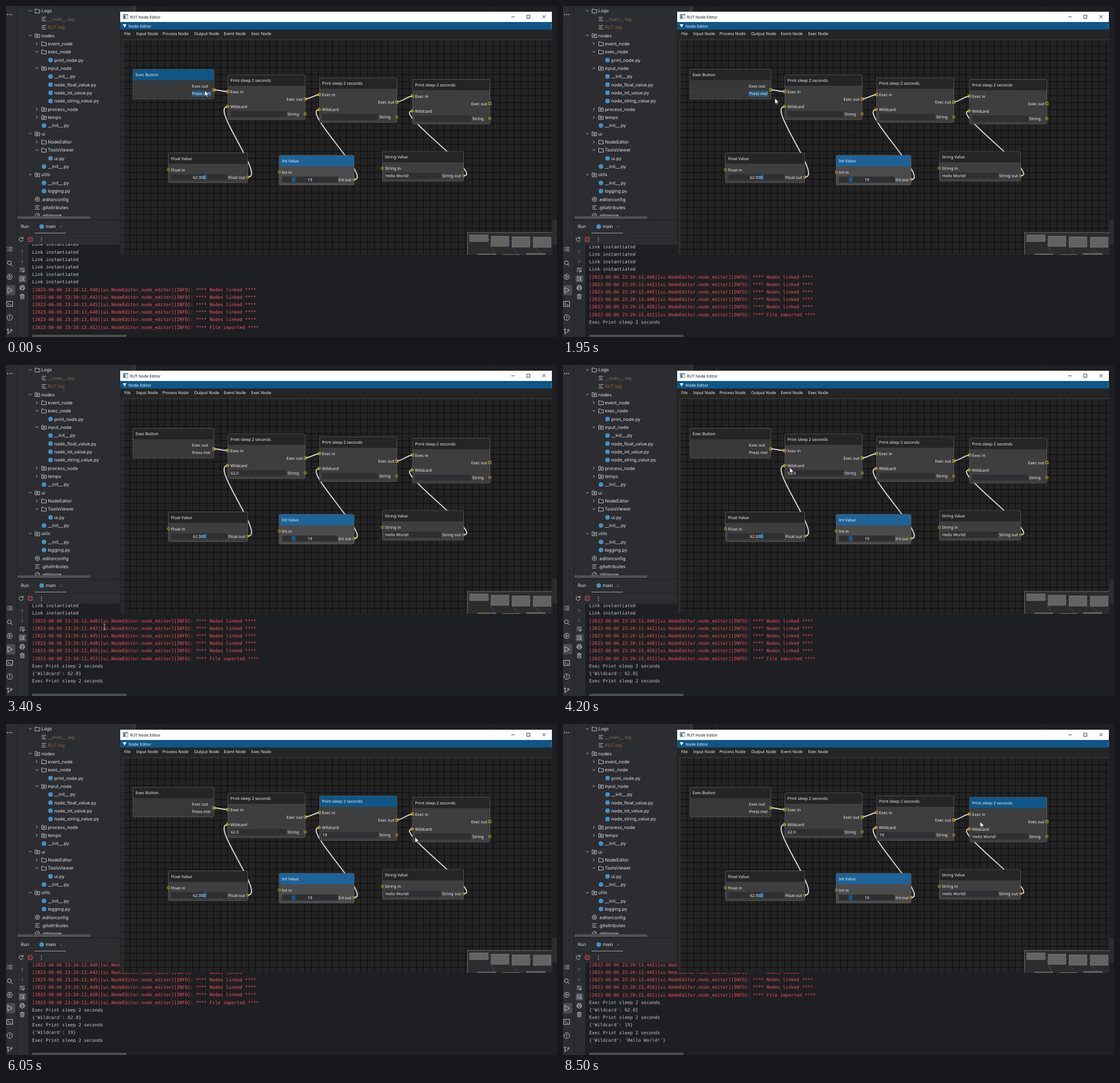
An HTML page for the animation above (8.55 s loop, 965 by 580 pixels).

```html
<!DOCTYPE html>
<html lang="en">
<head>
<meta charset="utf-8">
<title>Node editor</title>
<style>
  html, body { margin: 0; width: 100%; height: 100%; overflow: hidden; background: #1e1f22; }
  svg { display: block; }
  text { white-space: pre; text-rendering: geometricPrecision; }
  .ide { font: 7.95px Inter, sans-serif; fill: #dfe1e5; }
  .log { font: 7.95px "DejaVu Sans Mono", monospace; fill: #c6c8ce; }
  .ui { font: 7.13px "Noto Sans", sans-serif; fill: #f2f2f2; }
  .cap { font: 6.95px "Open Sans", sans-serif; fill: #000; }
  .ico { fill: none; stroke: #ced0d6; stroke-width: .9; stroke-linecap: round; stroke-linejoin: round; }
  .dim { stroke: #5f6268; }
  .link { fill: none; stroke: #d7d7d7; stroke-width: 1.9; }
  .map .link { stroke: #2f5f96; stroke-width: 3.5; }
  .pin { fill: none; stroke: #cdb414; stroke-width: 1; }
</style>
</head>
<body>
<script>
const LOOP = 8550;
const css = [];
let ids = 0;

// Timed keyframes: steps is a list of [ms, declarations]
function anim(steps, timing = 'step-end') {
  const name = 'k' + ids++;
  const frames = steps.map(([ms, d]) => `${(ms / LOOP * 100).toFixed(3)}%{${d}}`).join('');
  css.push(`@keyframes ${name}{${frames}}.${name}{animation:${name} ${LOOP}ms ${timing} infinite}`);
  return name;
}
function during(from, to, body) {
  const steps = [[0, `opacity:${from ? 0 : 1}`]];
  if (from) steps.push([from, 'opacity:1']);
  if (to < LOOP) steps.push([to, 'opacity:0']);
  steps.push([LOOP, `opacity:${to < LOOP ? 0 : 1}`]);
  return `<g class="${anim(steps)}">${body}</g>`;
}

const rect = (x, y, w, h, fill, extra = '') =>
  `<rect x="${x}" y="${y}" width="${w}" height="${h}" fill="${fill}" ${extra}/>`;
const text = (cls, x, y, s, extra = '') =>
  `<text class="${cls}" x="${x}" y="${y + (cls === 'ide' ? 2.85 : 2.6)}" ${extra}>${s}</text>`;
const icon = (d, x, y, cls = '') =>
  `<path class="ico ${cls}" transform="translate(${x} ${y})" d="${d}"/>`;
const dot = (x, y, r, fill) => `<circle cx="${x}" cy="${y}" r="${r}" fill="${fill}"/>`;
const END = 'text-anchor="end"', MID = 'text-anchor="middle"';

// UI refreshes and console prints, in ms
const CLICK = 1150, UI = [3150, 5100, 6900], PRINT = [1450, 3400, 5350, 7300];

/* ---------- IDE behind ---------- */
function tree() {
  // depth, kind (o open, c closed, p python, l log, s settings, t text, i ignore), name
  const rows = `0o Logs|1l __main__.log|1l RUT.log|0O nodes|1c event_node|1o exec_node|2p print_node.py|1O input_node
|2p __init__.py|2p node_float_value.py|2p node_int_value.py|2p node_string_value.py|1C process_node|1C temps|1p __init__.py
|0O ui|1c NodeEditor|1o ToolsViewer|2p ui.py|1p __init__.py|0O utils|1p __init__.py|1p logging.py
|0s .editorconfig|0t .gitattributes|0i .gitignore`.replace(/\n/g, '').split('|');
  const lines = 'M-3.5 -3H3.5M-3.5 0H1.5M-3.5 3H3.5';
  const ring = 'M-3.8 0a3.8 3.8 0 1 0 7.6 0a3.8 3.8 0 1 0 -7.6 0';
  return rows.map((row, i) => {
    const depth = +row[0], kind = row[1], name = row.slice(3);
    const y = 8.6 + 14.35 * i, x = 55 + 11.5 * depth;
    let s = '';
    if (/[oc]/i.test(kind)) {
      s += icon(/o/i.test(kind) ? 'M-2 -1L0 1L2 -1' : 'M-1 -2L1 0L-1 2', x - 12.5, y);
      s += icon('M-4 3.2V-3.2H-1L0.2 -2H4V3.2Z', x, y);
      if (/[OC]/.test(kind)) s += icon('M-1 -.6H1V1.4H-1Z', x, y);
    } else if (kind === 'p') s += dot(x, y, 4, '#4790c2');
    else if (kind === 's') s += icon(ring + 'M-1.4 0a1.4 1.4 0 1 0 2.8 0a1.4 1.4 0 1 0 -2.8 0', x, y);
    else if (kind === 'i') s += icon(ring + 'M-2.6 2.6L2.6 -2.6', x, y);
    else s += icon(lines, x, y);
    const tint = i === 1 ? 'style="fill:#7d6b5b"' : i === 2 ? 'style="fill:#94602f"' : '';
    return s + text('ide', 62 + 11.2 * depth, y, name, tint);
  }).join('');
}

function sidebar() {
  let s = rect(0, 0, 19, 580, '#2b2d30') + rect(0, 489, 16, 18, '#4b4d52', 'rx="3"');
  s += [2.8, 6.6, 10.4].map(x => dot(x, 15, .9, '#ced0d6')).join('');
  const hex = 'M-4.8 0L-2.4 -4.2H2.4L4.8 0L2.4 4.2H-2.4Z';
  s += icon('M-4.5 -3H-4M-2 -3H4.5M-4.5 0H-4M-2 0H4.5M-4.5 3H-4M-2 3H4.5', 6.5, 426);
  s += icon('M-4 -1a3.4 3.4 0 1 0 6.8 0a3.4 3.4 0 1 0 -6.8 0M2 1.6L5 4.6', 6.5, 451);
  s += icon(hex + 'M-1 -2L2 0L-1 2Z', 6.5, 474.5);
  s += icon('M-3 -4.6L4.6 0L-3 4.6Z', 6.5, 498);
  s += icon('M-5 -4.4H5V4.4H-5ZM-3 -2L-1 0L-3 2M0 2H3', 6.5, 522);
  s += icon('M-4.8 0a4.8 4.8 0 1 0 9.6 0a4.8 4.8 0 1 0 -9.6 0M0 -2.6V.6M0 2.4V2.5', 6.5, 546);
  s += icon('M-3 -1.6V5M-4.4 -3a1.4 1.4 0 1 0 2.8 0a1.4 1.4 0 1 0 -2.8 0M1.6 -2a1.4 1.4 0 1 0 2.8 0a1.4 1.4 0 1 0 -2.8 0M3 -.6Q3 2 -3 2.4', 6.5, 570);
  return s;
}

function runPanel() {
  let s = rect(19, 374, 946, 206, '#2b2d30') + rect(19, 374, 946, 1, '#1e1f22');
  s += text('ide', 26, 386.5, 'Run', 'font-weight="600"') + dot(62.5, 386.5, 4, '#4790c2');
  s += text('ide', 69.5, 386.5, 'main') + icon('M-1.8 -1.8L1.8 1.8M1.8 -1.8L-1.8 1.8', 96.5, 387, 'dim');
  s += rect(50, 397, 55, 1.8, '#6f737a') + rect(19, 399, 946, .7, '#1e1f22');
  s += icon('M3 -2A3.5 3.5 0 1 0 3.5 1M3.5 -4V-1.5H1', 26.5, 409);
  s += rect(39, 405.5, 7, 7, '#5a2c30', 'rx="1" stroke="#db5c5c" stroke-width=".9"');
  s += [405.8, 409, 412.2].map(y => dot(62, y, .8, '#ced0d6')).join('');
  s += rect(39, 418, 926, 162, '#1e1f22');
  s += rect(22, 471.5, 13.5, 13, '#4b4d52', 'rx="2.5"');
  s += icon('M0 3V-3M-2.5 -.6L0 -3L2.5 -.6', 28.5, 431, 'dim') + icon('M0 -3V3M-2.5 .6L0 3L2.5 .6', 28.5, 447, 'dim');
  s += icon('M-4 -3H4M-4 0H2.5Q4 0 4 1.5T2.5 3H0M1.4 1.6L0 3L1.4 4.4M-4 3H-2.5', 28.5, 462.5);
  s += icon('M-4 -3H4M-4 0H-1M-4 3H4M2 -1.5V1.5M.6 .4L2 1.6L3.4 .4', 28.5, 478);
  s += icon('M-2.4 -1.5V-4H2.4V-1.5M-2.4 2H-4V-1.5H4V2H2.4M-2.4 .6H2.4V4H-2.4Z', 28.5, 493.5);
  s += icon('M-3.6 -2.6H3.6M-1.2 -2.6V-4H1.2V-2.6M-2.8 -2.6V4H2.8V-2.6M-.9 -.6V2M.9 -.6V2', 28.5, 509);
  return s;
}

function consoleLog() {
  const pitch = 13.2, first = 417.7;
  const stamp = '[2023-06-06 23:20:13,';
  const red = [440, 442, 445, 448, 450, 452].map((ms, i) =>
    `${stamp}${ms}][ui.NodeEditor.node_editor][INFO]: **** ${i < 5 ? 'Nodes linked' : 'File imported'} ****`);
  const exec = 'Exec Print sleep 2 seconds';
  const printed = [[exec], ["{'Wildcard': 62.0}", exec], ["{'Wildcard': 19}", exec], ["{'Wildcard': 'Hello World!'}"]];
  let n = 0, s = '';
  const line = (t, tint = '') => text('log', 45.8, first + pitch * n++, t, tint);
  for (let i = 0; i < 6; i++) s += line('Link instantiated');
  red.forEach(t => { s += line(t, 'style="fill:#f9525f"'); });
  const steps = [[0, 'transform:translateY(0)']];
  printed.forEach((group, i) => {
    s += during(PRINT[i], LOOP, group.map(t => line(t)).join(''));
    steps.push([PRINT[i], `transform:translateY(${(553.8 - first - pitch * (n - 1)).toFixed(1)}px)`]);
  });
  steps.push([LOOP, steps[4][1]]);
  return `<g clip-path="url(#log)"><g class="${anim(steps)}">${s}</g></g>` + rect(46, 576, 165, 4, '#4d4e51');
}

/* ---------- editor window ---------- */
const NODES = {
  exec: [222.5, 111, 141.5, 52], p1: [388.5, 120.7, 135.5, 78.3], p2: [549, 126, 135.5, 78.3],
  p3: [712, 128.5, 135.5, 78.3], float: [284.5, 257.5, 139, 52], int: [478.5, 261.7, 131, 52], str: [659, 255, 142.5, 52]
};
const BLUE = '#0f5687', FIELD = '#2f2f32';

const bar = (k, fill) => rect(NODES[k][0], NODES[k][1], NODES[k][2], 19, fill, 'rx="1.6"');
function box(k, title, body = '#3e3e3e', head = '#252526', lit = '') {
  const [x, y, w, h] = NODES[k];
  return rect(x, y, w, h, body, 'rx="2"') + bar(k, head) + lit +
    rect(x, y, w, h, 'none', 'rx="2" stroke="#646464" stroke-width=".7"') + text('ui', x + 4.6, y + 9.6, title);
}
const square = (x, y) => `<rect class="pin" x="${x - 2.1}" y="${y - 2.1}" width="4.2" height="4.2"/>`;
const ring = (x, y) => `<circle class="pin" cx="${x}" cy="${y}" r="2.1"/>`;
const tri = (x, y) => `<path class="pin" style="fill:#8a7a18" d="M${x - 2} ${y - 2.7}L${x + 2.6} ${y}L${x - 2} ${y + 2.7}Z"/>`;

function printNode(k, value, at, lit) {
  const [x, y, w] = NODES[k];
  return box(k, 'Print sleep 2 seconds', '#3e3e3e', '#252526', lit) +
    text('ui', x + 4.6, y + 29.4, 'Exec in') + text('ui', x + w - 4.6, y + 42.4, 'Exec out', END) +
    text('ui', x + 4.6, y + 55.4, 'Wildcard') + rect(x + 4.6, y + 63.3, 98, 10.6, FIELD) +
    text('ui', x + 104.6, y + 68.6, 'String') + during(at, LOOP, text('ui', x + 5.2, y + 68.6, value)) +
    square(x, y + 29.2) + square(x + w, y + 42.3) + tri(x, y + 55.4) + ring(x + w, y + 68.5);
}
function valueNode(k, type, control, body, head) {
  const [x, y, w] = NODES[k];
  return box(k, type + ' Value', body, head) + text('ui', x + 4.6, y + 29.5, type + ' in') +
    rect(x + 4.8, y + 37.2, 98, 10.6, FIELD) + control(x + 4.8, y + 42.4) +
    text('ui', x + w - 4.6, y + 42.5, type + ' out', END) + ring(x, y + 29.4) + ring(x + w, y + 42.4);
}
const slider = (pos, value) => (x, y) =>
  rect(x + pos, y - 4.3, 6, 8.6, '#145c8e') + text('ui', x + 49, y + .2, value, MID);

function link(a, ya, b, yb) {
  const [x0, y0, w] = NODES[a], [x1, y1] = NODES[b];
  const sx = x0 + w, sy = y0 + ya, ey = y1 + yb, o = Math.hypot(x1 - sx, ey - sy) / 4;
  return `<path class="link" d="M${sx} ${sy}C${sx + o} ${sy} ${x1 - o} ${ey} ${x1} ${ey}"/>`;
}
const links = () => link('exec', 36, 'p1', 29.2) + link('p1', 42.3, 'p2', 29.2) + link('p2', 42.3, 'p3', 29.2) +
  link('float', 42.4, 'p1', 55.4) + link('int', 42.4, 'p2', 55.4) + link('str', 42.4, 'p3', 55.4);

function grid() {
  const step = 12.24;
  let d = '';
  for (let x = 204.5 + step; x < 956; x += step) d += `M${x.toFixed(2)} 59V435`;
  for (let y = 59 + step; y < 435; y += step) d += `M204.5 ${y.toFixed(2)}H956`;
  return `<path d="${d}" stroke="#000" stroke-width=".65"/>`;
}

function minimap() {
  const nodes = Object.values(NODES).map(n => rect(...n, '#636363', 'stroke="#8c8c8c" stroke-width="2.5"')).join('');
  return rect(808.5, 397, 150, 42, '#2c2c2c', 'stroke="#8a8a8a" stroke-width=".7"') +
    `<g class="map" transform="translate(812 401) scale(.228) translate(-222.5 -111)">${links()}${nodes}</g>`;
}

function editor() {
  let s = rect(199.5, 10, 757, 426, '#252526') + rect(200, 10, 756, 18, '#fff');
  s += rect(205, 14.5, 8.5, 8, '#e8eef4', 'stroke="#7a8794" stroke-width=".7"') + rect(205.6, 16.6, 3.6, 5.4, '#3f78a8') + rect(205, 14.5, 8.5, 1.7, '#7a8794');
  s += text('cap', 217, 19, 'RUT Node Editor');
  s += '<path d="M885 19H891M912 16H917.5V21.5H912ZM939.5 16L945 21.5M945 16L939.5 21.5" fill="none" stroke="#111" stroke-width=".8"/>';
  s += rect(200, 28, 756, 13.5, BLUE) + '<path d="M204.5 32H211L207.7 37.8Z" fill="#fff"/>' + text('ui', 214.5, 35, 'Node Editor');
  s += '<path d="M954.5 32.4L956 33.9M956 36.5L954.5 38" fill="none" stroke="#fff" stroke-width=".8"/>';
  s += rect(200, 41.5, 756, 13, '#252526');
  [[207, 'File'], [228, 'Input Node'], [274, 'Process Node'], [329.5, 'Output Node'], [381.5, 'Event Node'], [429.5, 'Exec Node']]
    .forEach(([x, t]) => { s += text('ui', x, 48.3, t); });
  s += rect(204.5, 59, 760, 380, '#232323', 'stroke="#4e4e4e" stroke-width=".7"') + grid() + links();

  const press = rect(325.3, 148.4, 34.2, 10.4, '#26587f');
  const [ex, ey, ew] = NODES.exec;
  s += box('exec', 'Exec Button', '#383838', '#252526', during(0, CLICK, bar('exec', BLUE)));
  s += during(0, UI[0], press) + text('ui', 354, 140.5, 'Exec out', END) + text('ui', 326, 153.6, 'Press me!') + square(ex + ew, ey + 36);
  s += printNode('p1', '62.0', UI[0], '');
  s += printNode('p2', '19', UI[1], during(UI[1], UI[2], bar('p2', BLUE)));
  s += printNode('p3', 'Hello World!', UI[2], during(UI[2], LOOP, bar('p3', BLUE)));
  s += valueNode('float', 'Float', slider(56.5, '62.000'));
  s += valueNode('int', 'Int', slider(17.5, '19'), '#4b4b4b', '#1d6398');
  s += valueNode('str', 'String', (x, y) => text('ui', x + .6, y + .2, 'Hello World!'));
  return `<g clip-path="url(#win)">${s}${minimap()}</g>`;
}

/* ---------- pointer ---------- */
function pointer() {
  const path = [[0, 348, 148], [200, 343, 151], [350, 341, 151], [750, 341, 151], [1100, 347, 153], [1350, 357.5, 156.5],
    [1600, 371, 161.5], [2150, 371, 161.5], [2450, 270, 350], [2750, 162, 526], [2900, 108, 548], [3250, 106, 549],
    [3600, 260, 340], [3950, 397, 181], [4200, 397, 179.5], [4400, 412, 169], [4700, 560, 228], [4850, 603, 246],
    [5200, 580, 194], [5750, 678, 189.5], [6200, 735, 202], [6600, 752, 203], [6950, 746, 202], [7300, 753, 194],
    [7600, 755, 189], [8200, 735, 174], [8500, 730.5, 171], [8549, 730.5, 171], [LOOP, 348, 148]];
  const move = anim(path.map(([t, x, y]) => [t, `transform:translate(${x}px,${y}px)`]), 'linear');
  const arrow = '<path d="M0 0V10.2L2.4 8L4 11.6L5.7 10.9L4.1 7.4H7.4Z" fill="#fff" stroke="#000" stroke-width=".7"/>';
  const beam = '<path d="M-2 -5H-.5L0 -4.5L.5 -5H2M0 -4.5V4.5M-2 5H-.5L0 4.5L.5 5H2" fill="none" stroke="#e4e4e4" stroke-width=".8"/>';
  const spans = [[0, 2600, arrow], [2600, 3450, beam], [3450, UI[2], arrow], [UI[2], 7350, beam], [7350, LOOP, arrow]];
  return `<g class="${move}">${spans.map(span => during(...span)).join('')}</g>`;
}

const scene = rect(0, 0, 965, 580, '#1e1f22') + rect(19.6, 0, 208, 374, '#2b2d30') +
  rect(222, 0, 5.5, 10, '#34363a') + rect(269.5, 0, .8, 10, '#35373b') + rect(846.5, 0, .8, 10, '#35373b') +
  tree() + rect(20, 368.5, 127.5, 4.5, '#505255') + runPanel() + sidebar() + rect(19, 0, .7, 580, '#1e1f22') +
  consoleLog() + editor() + pointer();
document.body.innerHTML = `<svg width="965" height="580" viewBox="0 0 965 580"><defs>
  <clipPath id="log"><rect x="40" y="417.5" width="925" height="158"/></clipPath>
  <clipPath id="win"><rect x="199.5" y="10" width="757" height="425.5"/></clipPath></defs>${scene}</svg>`;
const sheet = document.createElement('style');
sheet.textContent = css.join('\n');
document.head.append(sheet);
</script>
</body>
</html>
```
